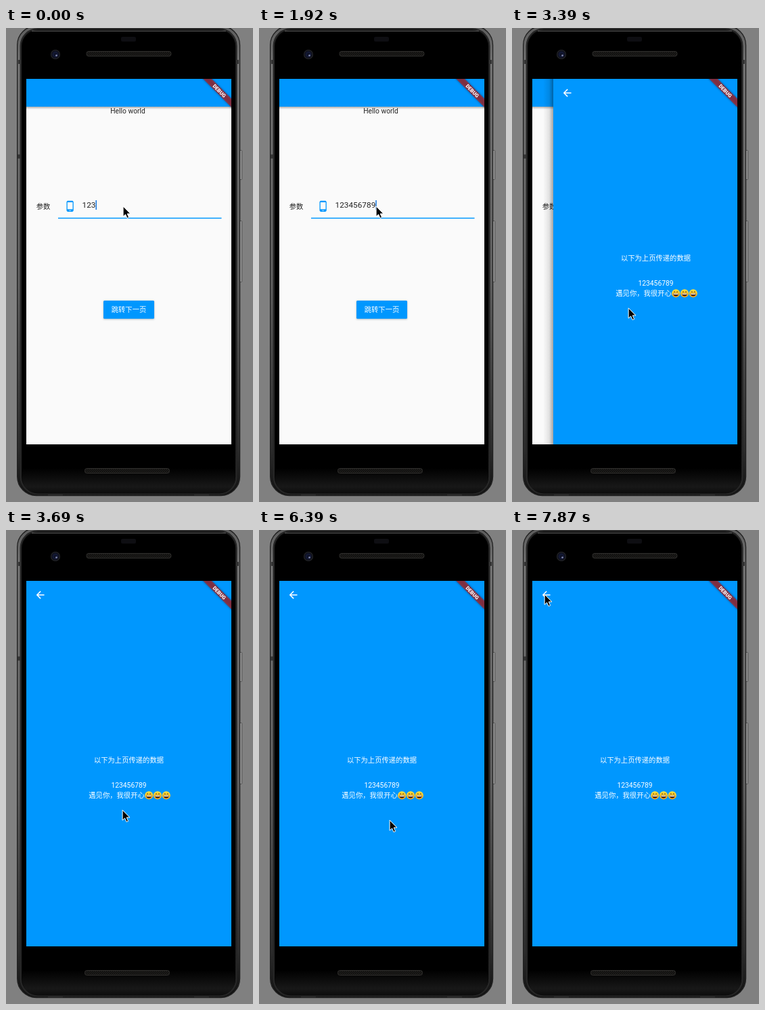
Write an HTML page that moves like this. It is 365 px wide and 699 px high and loops after 8 s.

```html
<!DOCTYPE html>
<html lang="zh">
<head>
<meta charset="utf-8">
<style>
  html, body { margin: 0; width: 100%; height: 100%; overflow: hidden; background: #808080; }
  svg { display: block; width: 365px; height: 699px; }
  text { font: 10.32px Roboto, "Noto Sans CJK SC", "Noto Sans CJK", sans-serif; }
  .mid { text-anchor: middle; }
</style>
</head>
<body>
<svg viewBox="0 0 365 699">
  <defs>
    <linearGradient id="metal" x2="0" y2="1">
      <stop offset="0" stop-color="#5c5c5c"/>
      <stop offset=".08" stop-color="#757575"/>
      <stop offset=".55" stop-color="#606060"/>
      <stop offset=".9" stop-color="#2c2c2c"/>
      <stop offset="1" stop-color="#101010"/>
    </linearGradient>
    <linearGradient id="chin" x2="0" y2="1">
      <stop offset=".945" stop-color="#000"/>
      <stop offset=".985" stop-color="#181818"/>
      <stop offset="1" stop-color="#0c0c0c"/>
    </linearGradient>
    <linearGradient id="drop" x2="0" y2="1">
      <stop offset="0" stop-opacity=".3"/>
      <stop offset="1" stop-opacity="0"/>
    </linearGradient>
    <linearGradient id="side">
      <stop offset="0" stop-opacity="0"/>
      <stop offset=".6" stop-opacity=".1"/>
      <stop offset="1" stop-opacity=".35"/>
    </linearGradient>
    <linearGradient id="face" x2="0" y2="1">
      <stop offset="0" stop-color="#ffdf3e"/>
      <stop offset=".6" stop-color="#fdc62c"/>
      <stop offset="1" stop-color="#ec9a1e"/>
    </linearGradient>
    <radialGradient id="lens">
      <stop offset="0" stop-color="#0c0e1c"/>
      <stop offset=".5" stop-color="#141a38"/>
      <stop offset=".75" stop-color="#0e0f16"/>
      <stop offset="1" stop-color="#2c2d32"/>
    </radialGradient>
    <pattern id="mesh" width="3" height="3" patternUnits="userSpaceOnUse">
      <rect width="3" height="3" fill="#0f0f0e"/>
      <path d="M0 0L3 3M3 0L0 3" stroke="#22211f" stroke-width=".7"/>
    </pattern>
    <filter id="blur" x="-30%" y="-100%" width="160%" height="300%"><feGaussianBlur stdDeviation="1.8"/></filter>
    <clipPath id="screen"><rect x="30" y="75" width="303" height="539"/></clipPath>
    <g id="grin">
      <circle r="6.1" fill="url(#face)"/>
      <path d="M-2.8-1.6q.8-2.200 1.600 0M1.200-1.600q.8-2.200 1.600 0" fill="none" stroke="#4e2a0c"/>
      <path d="M-4.300 .3H4.300Q3.700 4.200 0 4.200T-4.300 .3z" fill="#4a2410"/>
      <path d="M-3.800 .5H3.800L3.400 1.700H-3.400z" fill="#fff"/>
    </g>
  </defs>

  <!-- phone body -->
  <g fill="#9c9c9c" stroke="#444" stroke-width=".8">
    <rect x="344.500" y="180.500" width="4.200" height="43" rx="1"/>
    <rect x="344.500" y="284.500" width="4.200" height="90" rx="1"/>
  </g>
  <rect x="16.700" y="-3" width="328.800" height="692.500" rx="28" fill="url(#metal)" stroke="#222" stroke-width="1.400"/>
  <rect x="21.800" y="1.500" width="318.600" height="685.500" rx="25" fill="#050505" stroke="#262626" stroke-width="2.500"/>
  <path d="M18 50H22M340 50H344M17 189.500H21" stroke="#333" stroke-width="6"/>
  <rect x="24" y="4.500" width="314.500" height="682" rx="23" fill="url(#chin)"/>
  <path d="M38 4.500H325" stroke="#606060"/>
  <path d="M62 688.500H84M278 688.500H300" stroke="#2a2a2a" stroke-width="2"/>
  <rect x="170" y="13" width="22" height="7" rx="2" fill="#0e0e12"/>
  <circle cx="73" cy="39" r="7" fill="url(#lens)"/>
  <circle cx="74.500" cy="40.500" r="1.300" fill="#8d93b8"/>
  <g fill="url(#mesh)" stroke="#302f2d">
    <rect x="119" y="34.500" width="125" height="7" rx="3"/>
    <rect x="116.500" y="649.500" width="125" height="7" rx="3"/>
  </g>

  <g clip-path="url(#screen)">
    <!-- form page -->
    <rect x="30" y="75" width="303" height="539" fill="#fafafa"/>
    <rect x="30" y="116" width="303" height="4" fill="url(#drop)"/>
    <rect x="30" y="75" width="303" height="41" fill="#0097fe"/>
    <g fill="#222">
      <text class="mid" x="180" y="125.500">Hello world</text>
      <text x="44.800" y="266.500">参数</text>
      <text id="field" x="112.600" y="265" style="font-size:11.8px"></text>
    </g>
    <path transform="translate(85.800 254.100) scale(.737)" fill="#0097fe" d="M16 1H8C6.340 1 5 2.340 5 4v16c0 1.660 1.340 3 3 3h8c1.660 0 3-1.340 3-3V4c0-1.660-1.340-3-3-3zm-2 20h-4v-1h4v1zm3.250-3H6.750V4h10.500v14z"/>
    <rect x="77" y="279.700" width="241.500" height="1.500" fill="#0097fe"/>
    <rect id="caret" y="254" width="1.500" height="14" fill="#1878e0"/>
    <rect id="shade" x="144" width="75" height="27" filter="url(#blur)"/>
    <rect id="button" x="144" y="402" width="75" height="26.700" rx="1.500"/>
    <text class="mid" x="181.500" y="419" fill="#fff">跳转下一页</text>

    <!-- result page -->
    <g id="next" fill="#fff">
      <rect x="15" y="75" width="15" height="539" fill="url(#side)"/>
      <rect x="30" y="75" width="303" height="539" fill="#0097fe"/>
      <path transform="translate(41.800 86.900) scale(.737)" d="M20 11H7.830l5.590-5.590L12 4l-8 8 8 8 1.410-1.410L7.830 13H20v-2z"/>
      <text class="mid" x="181.500" y="343.300">以下为上页传递的数据</text>
      <text class="mid" x="181.500" y="380">123456789</text>
      <text x="122.300" y="394.800">遇见你，我很开心</text>
      <use href="#grin" x="211.200" y="391.300"/>
      <use href="#grin" x="224" y="391.300"/>
      <use href="#grin" x="236.800" y="391.300"/>
    </g>

    <g transform="translate(333 75) rotate(45)">
      <rect x="-32" y="20.600" width="64" height="8.840" opacity=".5" filter="url(#blur)"/>
      <rect x="-32" y="20.600" width="64" height="8.840" fill="#c4201f" fill-opacity=".65"/>
      <text class="mid" y="27.700" fill="#fff" style="font-size:7.5px;font-weight:900">DEBUG</text>
    </g>
  </g>

  <path id="pointer" d="M.5 .8V16L4 12.800L6.400 18.300L9 17.200L6.600 11.800H11.300z" stroke="#fff"/>
</svg>
<script>
const $ = id => document.getElementById(id);
const set = (id, attrs) => {
  for (const name in attrs) $(id).setAttribute(name, attrs[name]);
};

const LOOP = 8000;
const keyTimes = [150, 740, 1030, 1180, 1470, 1920];
// time, x, y of the pointer tip; each place holds until the next
const pointerPath = [
  [0, 172, 263], [2660, 172, 288], [2810, 172, 340], [2950, 171, 388], [3100, 171, 413],
  [3840, 171, 403], [3990, 172, 390],
  [4890, 180, 405], [5040, 199, 441], [5190, 209, 458],
  [6390, 192, 428], [6540, 147, 336], [6690, 101, 243], [6830, 81, 206],
  [7130, 60, 177], [7280, 45, 143], [7420, 39, 119], [7570, 41, 105], [7720, 45, 98], [7870, 47, 95]
];
// time and left offset of the result page
const slide = [[0, 340], [3390, 31], [3540, 4], [3690, 0]];

const held = (keys, t) => keys.findLast(key => key[0] <= t);
const within = (t, from, to) => t >= from && t < to;

function draw(now) {
  const t = now % LOOP;
  const count = 3 + keyTimes.filter(time => time <= t).length;
  $("field").textContent = "123456789".slice(0, count);
  const caretOff = within(t, 590, 740) || within(t, 2360, 2810);
  set("caret", { x: 112.6 + count * 6.63, opacity: caretOff ? 0 : 1 });

  const pressed = t >= 3250;
  set("button", { fill: pressed ? "#0c9cf8" : "#0097fe" });
  set("shade", { y: pressed ? 405 : 402.6, opacity: pressed ? 0.4 : 0.25 });

  set("next", { transform: `translate(${held(slide, t)[1]} 0)` });
  const [, x, y] = held(pointerPath, t);
  set("pointer", { transform: `translate(${x + 0.6} ${y - 0.9})` });
  requestAnimationFrame(draw);
}
draw(performance.now());
</script>
</body>
</html>
```
